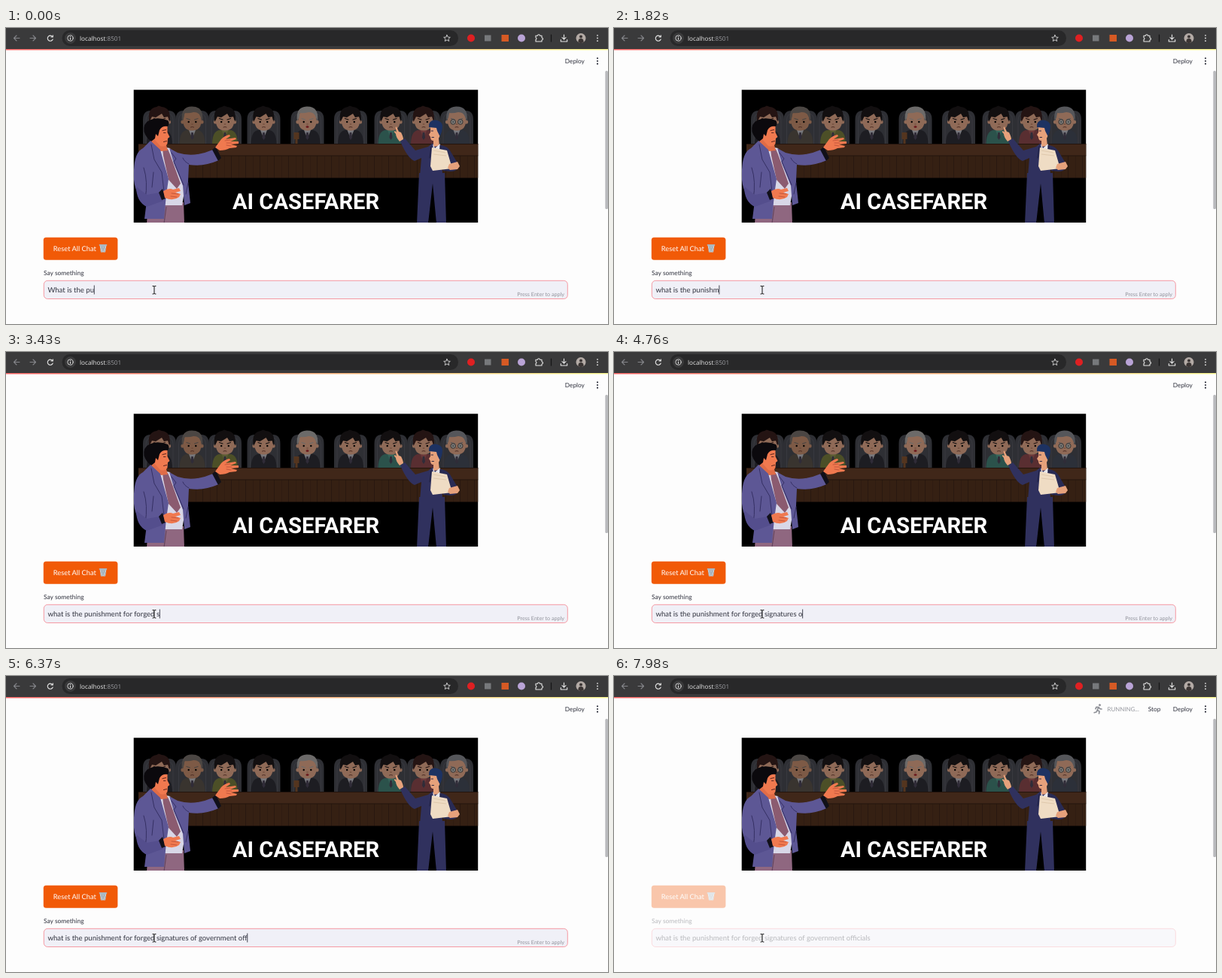
An HTML page that plays this animation: 800x394 px, repeating every 8000 ms.

```html
<!DOCTYPE html>
<html lang="en">
<head>
<meta charset="utf-8">
<title>Legal chat</title>
<style>
  html, body { margin: 0; width: 100%; height: 100%; overflow: hidden; background: #fdfdfd; }
  svg { display: block; width: 100%; height: 100%; }
  text { font-family: Lato, sans-serif; white-space: pre; text-rendering: geometricPrecision; }
  .line { fill: none; stroke-linecap: round; stroke-linejoin: round; }
</style>
</head>
<body>
<svg viewBox="0 0 800 394" preserveAspectRatio="none">
  <defs>
    <linearGradient id="strip">
      <stop offset="0" stop-color="#ff4b4b"/><stop offset="1" stop-color="#fffd80"/>
    </linearGradient>
    <pattern id="slats" width="19" height="30" patternUnits="userSpaceOnUse" x="176" y="170">
      <rect width="19" height="30" fill="#352013"/>
      <path d="M0 0V30M9.5 0V30" stroke="#291810"/>
    </pattern>
    <clipPath id="bannerClip"><rect x="169.700" y="82.200" width="457.500" height="176.800"/></clipPath>
  </defs>

  <!-- browser bar -->
  <rect width="800" height="28.200" fill="#3a3a3b"/>
  <rect y="28.200" width="800" height="1.200" fill="url(#strip)"/>
  <rect x="74.500" y="3" width="526.500" height="21" rx="10.500" fill="#282829"/>
  <g class="line" stroke="#85868a" stroke-width="1.100">
    <path d="M18 13.500H10.500M14 10L10.500 13.500L14 17M32 13.500H39.500M36 10L39.500 13.500L36 17"/>
    <path d="M61.700 11.500A3.600 3.600 0 1 0 62.200 15M62.300 9.700V12H59.900" stroke="#e6e6e6"/>
    <circle cx="85.500" cy="13.500" r="7.500" fill="#3a3a3b" stroke="none"/>
    <circle cx="85.500" cy="13.500" r="3.700" stroke="#e0e0e0" stroke-width=".9"/>
    <path d="M85.500 13.200V15.300M85.500 11.500V11.600" stroke="#e0e0e0" stroke-width="1"/>
    <path d="M586 9.300L587.300 12.100L590.300 12.400L588 14.500L588.700 17.500L586 15.900L583.300 17.500L584 14.500L581.700 12.400L584.700 12.100Z" stroke="#d4d4d4" stroke-width=".9"/>
    <path d="M704 10.300H706.500A1.500 1.500 0 1 1 709.500 10.300H712V13A1.500 1.500 0 1 1 712 16V18H704V15.500A1.500 1.500 0 0 0 704 12.700Z" stroke="#e6e6e6"/>
    <path d="M741.500 9V15M739 12.700L741.500 15.200L744 12.700M737.300 15.500V18H745.700V15.500" stroke="#e6e6e6"/>
    <path d="M724.500 9V18" stroke="#161617" stroke-width="1.200"/>
  </g>
  <text x="98" y="16.500" font-size="8.200" fill="#e8e8e8" style="font-family:'Open Sans',sans-serif">localhost<tspan fill="#9b9ca0">:8501</tspan></text>
  <circle cx="618" cy="13.500" r="5" fill="#df2022"/>
  <rect x="636" y="9.500" width="8.500" height="8" fill="#77797c"/>
  <rect x="658.500" y="9" width="9.500" height="9" fill="#d65a24"/>
  <circle cx="685" cy="13.500" r="5" fill="#b9a3d6"/>
  <circle cx="764" cy="13.500" r="6.500" fill="#b3aaa5"/>
  <path d="M760.500 19Q760 14 764 14Q768 14 767.500 19Q764 21 760.500 19Z" fill="#3b3534"/>
  <circle cx="764" cy="11.500" r="2" fill="#3b3534"/>
  <g fill="#e6e6e6"><circle cx="786" cy="9.800" r=".9"/><circle cx="786" cy="13.500" r=".9"/><circle cx="786" cy="17.200" r=".9"/></g>

  <!-- page header -->
  <g id="status">
    <g class="line" stroke="#8d8f96" stroke-width="1.700">
      <circle cx="645.500" cy="38.700" r="1.100" fill="#8d8f96" stroke-width=".8"/>
      <path d="M644 41.500L642.200 45.500L645 47L644.600 50M642.200 45.500L641 48L638.200 48.700M640 43.700L641 41.400L644 41.500L645.600 43.600L648 44"/>
    </g>
    <text x="655.500" y="46.800" font-size="7.900" fill="#94969d">RUNNING...</text>
    <text x="709.800" y="46.900" font-size="8.300" fill="#31333f">Stop</text>
  </g>
  <text x="742.800" y="46.900" font-size="8.300" fill="#31333f">Deploy</text>
  <g fill="#31333f"><circle cx="786" cy="40.300" r="1.100"/><circle cx="786" cy="44" r="1.100"/><circle cx="786" cy="47.700" r="1.100"/></g>
  <rect x="796.300" y="57" width="3.700" height="184" rx="1.500" fill="#b9babd"/>

  <!-- banner -->
  <g clip-path="url(#bannerClip)">
    <rect x="169" y="82" width="459" height="178"/>
    <g id="judges"></g>
    <rect x="176" y="154" width="452" height="45.500" fill="url(#slats)"/>
    <rect x="176" y="154" width="452" height="16" fill="#402719"/>
    <path d="M176 154.500H628M176 170H628" stroke="#23140d"/>

    <g id="leftMan">
      <path d="M189 232H236L237 260H187Z" fill="#8f6780"/>
      <path d="M213 238L210 260" stroke="#65465f" stroke-width="1.200"/>
      <path d="M202 157L218 160L238 212L234 236H208Z" fill="#d8d7e7"/>
      <path d="M208 161L215 161L218 168L232 207L227 214L216 202L209 170Z" fill="#8b5b70"/>
      <path d="M193 140L206 150L213 156L215 163L206 164L192 156Z" fill="#e06c47"/>
      <path d="M198 134Q206 127 214.500 130L214.500 139L217.500 145L215 147L214.500 154Q212 159 205 157L196 147Z" fill="#f0794f"/>
      <path d="M183.500 138Q182 127 190 123Q201 117.500 215 123Q218 126 215 131Q207 130 204 136L202 144L199 141L198 147L193 151Q186 146 183.500 138Z" fill="#0b090d"/>
      <path class="line" d="M208 136.500L212.500 135.500M209.500 139.500H212M209.500 151.500L213.500 150.500" stroke="#59231d" stroke-width="1"/>
      <path d="M192 150L205 162L216 201L213 222L210 254H184L187 230L174 218Q168 205 170.500 183Q172 165 182 160Z" fill="#5d5795"/>
      <path d="M217 160L228 166Q250 173 275 162L283 176Q262 185 243 182L242 205L245 233L237 236L235 210L223 180Z" fill="#5d5795"/>
      <path class="line" d="M193 155L197 175L207 192L210 218M220 166L226 174L223 178L236 209M183 186Q189 204 185 228M243 181Q237 178 235 173M196 192L194 212M242 206L239 221" stroke="#353064" stroke-width="1"/>
      <path d="M173 211L187 222L204 219L209 230L187 238Q173 231 173 211Z" fill="#544e8d"/>
      <path d="M274 162L279 158L286 173L282 177Z" fill="#111019"/>
      <path d="M278 159L286 148Q291 143 297 142L298 144L292 148L305 146L306 148L298 151L309 151V154L299 155L307 157L306 159L297 160Q292 163 284 163Z" fill="#f0794f"/>
      <path class="line" d="M291 150L298 149M293 153H300M293 156L299 157" stroke="#b84f38" stroke-width=".8"/>
      <path d="M203 219L208 214L212 227L207 229Z" fill="#111019"/>
      <path d="M209 217Q217 212 222 215L230 213L232 217L225 219L232 221L230 225Q222 231 211 226Z" fill="#f0794f"/>
      <path class="line" d="M220 220L229 221M219 224L227 225" stroke="#b84f38" stroke-width=".8"/>
    </g>

    <g id="rightMan">
      <path d="M549 193H583L585 260H572L567 207L561 260H546Z" fill="#30315e"/>
      <path d="M561 158L566 154L579 156L580 197H550L552 173L543 177Q534 174 524 151L530 147L544 163Z" fill="#30315e"/>
      <path d="M577 156Q586 157 590 163L602 183Q600 191 591 191L581 190Z" fill="#292b54"/>
      <path d="M523 151Q518 145 518 141L515.500 138L517 137L519 139L517.500 132L519 131.500L522 138L525 139Q528 145 528 148Z" fill="#e6a17b"/>
      <path d="M564 132H577Q578 142 575 147L576 157L568 158L568 150Q564 150 564 145L562 142L564 139Z" fill="#e6a17b"/>
      <path d="M567 154L570 160L577 154L575 169L569 168Z" fill="#e8e7ed"/>
      <path d="M562 132Q561 123 570 122.500Q579 123 580 130Q580 138 576.500 144L573 137L572 133Z" fill="#1d3262"/>
      <path class="line" d="M565 137H567.500M566 145.500H568.500M565 158L563 173M577 157L579 164" stroke="#191b3d" stroke-width=".9"/>
      <path d="M566 159L586 163L593 187L567 190L564 184Z" fill="#efdcc4"/>
      <path d="M568 163L584 166M568 168L585 170" stroke="#dbc3a6" stroke-width=".8"/>
      <path d="M589 181L600 178L603 184L600 188L590 189L587 186Z" fill="#e6a17b"/>
    </g>
    <text x="398.500" y="241" font-size="29.200" font-weight="700" text-anchor="middle" fill="#fff" style="font-family:Roboto,sans-serif">AI CASEFARER</text>
  </g>

  <!-- chat form -->
  <g id="form">
    <rect x="49.800" y="278.800" width="98.600" height="29.900" rx="3.500" fill="#f15a07"/>
    <text x="62.800" y="297" font-size="9.300" fill="#fff">Reset All Chat</text>
    <path d="M124.500 289H133.500L132 298.500H126Z" fill="#c3ccd3"/>
    <path class="line" d="M126.500 290L131 298M129.500 290L132 295M131.500 290L127 298M128.500 290L126 295" stroke="#8395a2" stroke-width=".6"/>
    <rect x="123.700" y="288" width="10.600" height="1.700" rx=".7" fill="#a9b5bf"/>
    <text x="50" y="328.900" font-size="8.450" fill="#31333f">Say something</text>
    <rect x="50.300" y="336.300" width="696" height="24.200" rx="5" fill="#f0f0f7" stroke="#f5828d" stroke-width=".8"/>
    <text id="query" x="55.400" y="352.100" font-size="9.570" fill="#31333f"></text>
    <rect id="caret" y="342.500" width=".9" height="12" fill="#31333f"/>
    <text id="hint" x="742" y="356.800" font-size="7.200" text-anchor="end" fill="#92949d">Press Enter to apply</text>
  </g>
  <path class="line" d="M195 343.500H196.300L197 344.200L197.700 343.500H199M197 344V353.500M195 354H196.300L197 353.300L197.700 354H199" stroke="#111" stroke-width="1"/>
</svg>

<script>
const $ = id => document.getElementById(id);

// Drawn around x = 0, sitting behind the bench at y = 154.
function judge({ x, hair = '#120f10', suit = '#1d1d22', shirt = '#77777c', skin = '#8f6a57', old, glasses, gavel }) {
  const fringe = old
    ? 'M-13.500 124Q-16 105 -1 104.500Q16 104 13.500 124L11 118Q9 112 2 112Q-5 114 -10 113L-11 119Z'
    : 'M-13.500 125Q-17 107 -4 105L-1 103.500L3 105Q16 106 13.500 125L11 118L6 119L3 114L-5 119L-10 118Z';
  return `<g transform="translate(${x})">
    <path d="M-22 154V122Q-22 110 -12 110H12Q22 110 22 122V154Z" fill="#2e2f34"/>
    <path d="M-18 154V123Q-18 114 -10 114H10Q18 114 18 123V154" fill="none" stroke="#38393f"/>
    <path d="M-17 155Q-17 138 -8 136H8Q17 138 17 155Z" fill="${suit}"/>
    <path d="M-4.500 136H4.500L0 147Z" fill="${shirt}"/>
    <path d="M-1.300 139H1.300L2 146L0 149L-2 146Z" fill="#302c38"/>
    <circle cx="-12.500" cy="125" r="2.600" fill="${skin}"/><circle cx="12.500" cy="125" r="2.600" fill="${skin}"/>
    <path d="M-12 121Q-12 109 0 109Q12 109 12 121Q13 136.500 0 136.500Q-13 136.500 -12 121Z" fill="${skin}"/>
    <path d="${fringe}" fill="${hair}"/>
    <path class="line" d="M-7.500 120.500L-3 122M7.500 120.500L3 122" stroke="${hair}" stroke-width="1.200"/>
    <circle cx="-4.800" cy="125" r="1.200"/><circle cx="4.800" cy="125" r="1.200"/>
    <path class="line" d="M-.8 128H.8" stroke="#694535"/>
    ${gavel
      ? '<ellipse cy="131.500" rx="2" ry="1.500" fill="#6b1d20"/><path d="M-18 139H-11V148H-18ZM-16 148H-13V154H-16Z" fill="#54351f"/>'
      : '<path class="line" d="M-2 132Q0 131 2 132" stroke="#43241d" stroke-width=".9"/>'}
    ${glasses ? '<g fill="#77878d" fill-opacity=".6" stroke="#333"><circle cx="-4.800" cy="125" r="3.300"/><circle cx="4.800" cy="125" r="3.300"/></g>' : ''}
  </g>`;
}

$('judges').innerHTML = [
  { x: 204, hair: '#241413' },
  { x: 247.500, hair: '#4b4643', suit: '#39342f', skin: '#7d5a46', old: true },
  { x: 291, suit: '#4c4f27', shirt: '#5b5c33' },
  { x: 342.500 },
  { x: 400.500, hair: '#6c6a69', old: true, gavel: true },
  { x: 458 },
  { x: 511.500, suit: '#2b524b', shirt: '#35645a' },
  { x: 555, hair: '#241413', suit: '#592e31', shirt: '#6b393a' },
  { x: 599, hair: '#55565a', suit: '#2c3039', old: true, glasses: true },
].map(judge).join('');

const LOOP = 8000, STEP = 70;
const RETYPE = 480, ENTER = 6930, FADE_START = 7050, FADE_END = 7950;
const firstTry = 'What is the pu';
const question = 'what is the punishment for forged signatures of government officials';
// [time, characters in the field]
const pace = [[0, 14], [70, 14], [RETYPE, 0], [1050, 10], [2520, 29], [3430, 35], [4760, 46], [6370, 62], [6860, 68], [LOOP, 68]];

function charsAt(t) {
  const i = pace.findIndex(([time]) => time > t);
  const [t0, n0] = pace[i - 1], [t1, n1] = pace[i];
  return Math.floor(n0 + (n1 - n0) * (t - t0) / (t1 - t0) + 1e-6);
}

function draw(now) {
  const t = Math.floor(now % LOOP / STEP) * STEP;
  const query = $('query');
  query.textContent = (t < RETYPE ? firstTry : question).slice(0, charsAt(t));
  $('caret').setAttribute('x', 55.2 + query.getComputedTextLength());

  const sent = t >= ENTER;
  $('hint').style.visibility = sent ? 'hidden' : 'visible';
  $('status').style.visibility = sent ? 'visible' : 'hidden';
  $('caret').style.visibility = t < 7450 ? 'visible' : 'hidden';

  const fade = Math.min(1, Math.max(0, (t - FADE_START) / (FADE_END - FADE_START)));
  $('form').style.opacity = 1 - 0.67 * fade ** 1.7;
}

const start = performance.now();
function tick() {
  draw(performance.now() - start);
  requestAnimationFrame(tick);
}
tick();
</script>
</body>
</html>
```
